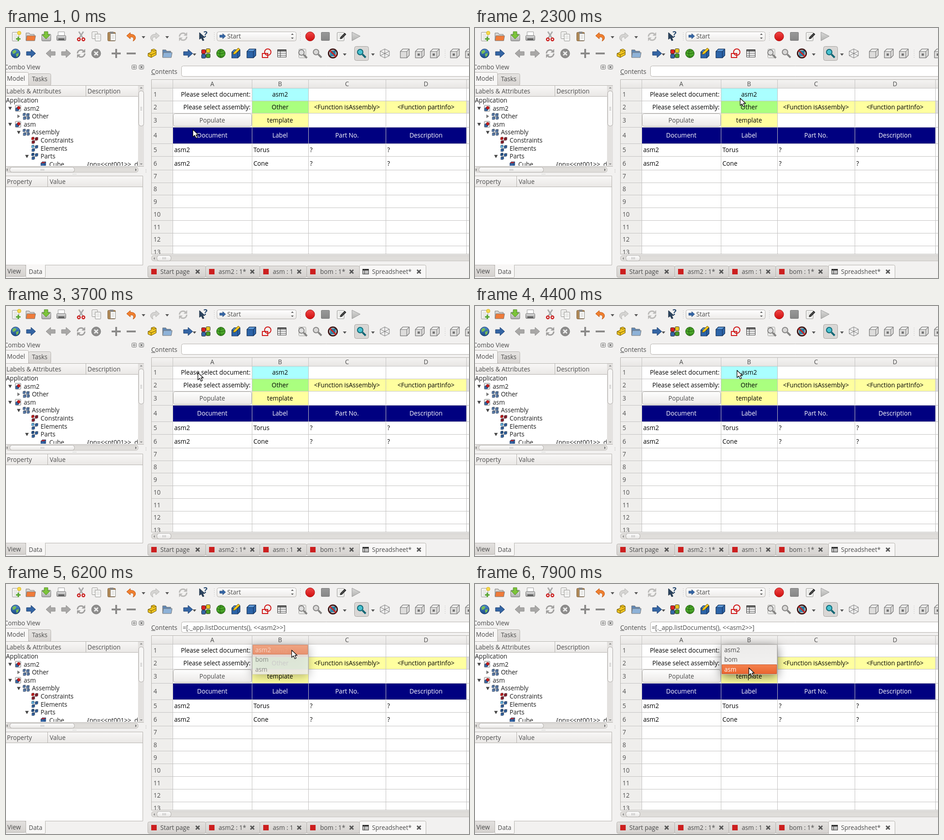
An HTML page with a canvas for the animation above (8 s loop, 1017x550 px).

```html
<!DOCTYPE html>
<html lang="en">
<head>
<meta charset="utf-8">
<title>Spreadsheet</title>
<style>
html, body { margin: 0; width: 100%; height: 100%; overflow: hidden; background: #f2f1f0; }
canvas { display: block; }
</style>
</head>
<body>
<canvas id="stage" width="1017" height="550"></canvas>
<script>
const W = 1017, H = 550, LOOP = 8000, STEP = 100;
const INK = '#4c4c4c', EDGE = '#b4b1ad', GRID = '#c3c2c1', BG = '#f2f1f0', BLUE = '#3465a4', RED = '#cc1f1f';
const screen = document.getElementById('stage').getContext('2d');
const base = document.createElement('canvas');
base.width = W;
base.height = H;
let g = base.getContext('2d');

function rect(x, y, w, h, fill) {
  g.fillStyle = fill;
  g.fillRect(x, y, w, h);
}

function box(x, y, w, h, fill, edge = EDGE, r = 0) {
  g.beginPath();
  g.roundRect(x + .5, y + .5, w - 1, h - 1, r);
  paint(fill, edge, 1);
}

function paint(fill, edge, lw = 1) {
  if (fill) { g.fillStyle = fill; g.fill(); }
  if (edge) { g.strokeStyle = edge; g.lineWidth = lw; g.stroke(); }
}

function circle(x, y, r, fill, edge, lw) {
  g.beginPath();
  g.arc(x, y, r, 0, 7);
  paint(fill, edge, lw);
}

function shape(x, y, d, fill, edge, lw = 1) {
  const p = new Path2D(d);
  g.save();
  g.translate(x, y);
  if (fill) { g.fillStyle = fill; g.fill(p); }
  if (edge) { g.strokeStyle = edge; g.lineWidth = lw; g.lineJoin = 'round'; g.stroke(p); }
  g.restore();
}

function fade(y, h, top, bottom) {
  const f = g.createLinearGradient(0, y, 0, y + h);
  f.addColorStop(0, top);
  f.addColorStop(1, bottom);
  return f;
}

function text(s, x, mid, color = '#1a1a1a', align = 'left') {
  g.font = '13.6px "Open Sans", "Noto Sans", sans-serif';
  g.fillStyle = color;
  g.textAlign = align;
  g.fillText(s, x, mid + 5);
}

const drop = (x, y) => shape(x, y, 'M-4-2H4L0 3Z', '#555');

function handle(x, y) {
  for (let i = -2; i <= 2; i++) rect(x, y + i * 4, 1, 1, '#aaa');
}

function cube(x, y, s, fill, edge, top = fill) {
  g.save();
  g.translate(x, y);
  g.scale(s, s);
  shape(0, 0, 'M-9-4L-4-9H9V4L4 9H-9Z', fill, edge, 1.2);
  shape(0, 0, 'M-9-4L-4-9H9L4-4Z', top, edge, 1);
  shape(0, 0, 'M4-4V9', null, edge, 1);
  g.restore();
}

function arrow(x, y, fill, edge, dir = 1, s = 1) {
  g.save();
  g.translate(x, y);
  g.scale(dir * s, s);
  shape(0, 0, 'M-10-4H0V-9L10 0L0 9V4H-10Z', fill, edge);
  g.restore();
}

function bend(x, y, fill, edge, dir) {
  g.save();
  g.translate(x, y);
  g.scale(dir, 1);
  shape(0, 0, 'M-10-2L-2-9V-5C6-6 11-1 9 5Q8 8 4 10C7 3 4 0-2 1V5Z', fill, edge);
  g.restore();
}

function reload(x, y, color) {
  shape(x, y, 'M-8 0A8 8 0 0 1 5-6M8 0A8 8 0 0 1-5 6', null, color, 3);
  shape(x, y, 'M9-10V-2H1ZM-9 10V2H-1Z', color);
}

function page(x, y, w = 14, h = 18) {
  box(x - w / 2, y - h / 2, w, h, '#fbfbfa', '#8c8c88', 1);
  for (let i = 4; i < h - 3; i += 3) rect(x - w / 2 + 3, y - h / 2 + i, w - 6, 1, '#c4c4c0');
}

function lens(x, y, color, glass) {
  shape(x, y, 'M2 2L9 9', null, color, 4);
  circle(x - 3, y - 3, 6, glass, color, 2);
}

function folder(x, y, back, front) {
  shape(x, y, 'M-10 8V-8H-3L-1-5H8V8Z', back, '#777');
  shape(x, y, 'M-10 9L-8-2H11L9 9Z', front, '#777');
}

function cross(x, y, r, color, lw) {
  shape(x, y, `M${-r} ${-r}L${r} ${r}M${r} ${-r}L${-r} ${r}`, null, color, lw);
}

function fileBar() {
  page(21, 19, 15, 20);
  circle(29, 11, 4, '#f5d94c', '#d8b520');
  shape(27, 24, 'M-5 0H5M0-5V5', null, '#55a630', 3);
  folder(54, 19, '#d9d7d3', '#ef7b3a');
  box(78, 13, 21, 16, fade(13, 16, '#e8e8e6', '#aaa'), '#777', 2);
  shape(88, 15, 'M-4-7H4V0H9L0 9L-9 0H-4Z', '#7cc43a', '#4b8a20');
  box(114, 8, 15, 10, '#fff', '#999');
  box(111, 16, 21, 12, fade(16, 12, '#ddd', '#999'), '#777', 2);
  rect(115, 23, 13, 3, '#555');
  shape(165, 18, 'M-5-10L4 4M5-10L-4 4', null, '#aaa', 3);
  circle(160, 25, 3, null, RED, 2.4);
  circle(170, 25, 3, null, RED, 2.4);
  page(195, 16, 13, 16);
  page(202, 21, 13, 16);
  box(223, 9, 18, 20, '#b08a58', '#80603a', 2);
  rect(228, 8, 8, 4, '#888');
  page(235, 20, 12, 16);
  bend(275, 19, '#f08030', '#c05510', 1);
  drop(302, 20);
  bend(327, 19, '#d5d4d2', '#b5b4b2', -1);
  drop(354, 20);
  reload(389, 19, '#bcbbb9');
  shape(425, 10, 'M0 0L0 15L4 12L7 18L10 17L7 11L12 11Z', '#2c4460', '#1a2c40');
  g.font = 'bold 18px "Open Sans", sans-serif';
  g.textAlign = 'left';
  g.fillStyle = '#27496f';
  g.fillText('?', 434, 20);
  handle(457, 18);
  box(463, 8, 175, 21, fade(8, 21, '#fff', '#eceae8'), EDGE, 4);
  arrow(476, 18, BLUE, '#1c3e6e', 1, .65);
  text('Start', 486, 18, INK);
  shape(629, 18, 'M-3-3L0-6L3-3ZM-3 3L0 6L3 3Z', '#555');
  handle(646, 18);
  circle(668, 18.5, 10, fade(9, 19, '#f04545', '#d01010'), '#a80d0d');
  box(692, 9, 19, 19, fade(9, 19, '#999', '#868686'), '#777', 1);
  page(735, 19, 16, 19);
  shape(737, 20, 'M-3 4L-2 0L7-9L10-6L1 3Z', '#444', '#222');
  shape(760, 18, 'M0-9L18 0L0 10Z', fade(-9, 19, '#d8d8d7', '#b4b4b2'), '#999');
}

function viewBar() {
  circle(21, 56, 10, fade(46, 20, '#4c88cc', '#1c4a86'), '#173c6c');
  shape(21, 56, 'M-7-5L-1-8L2-4L-2 0L-6 1ZM1 1L7-1L6 5L2 8Z', '#79bd55');
  arrow(55, 56, BLUE, '#1c3e6e');
  arrow(98, 56, '#a9a8a7', '#8c8b8a', -1);
  arrow(132, 56, '#a9a8a7', '#8c8b8a');
  reload(165, 56, '#a09f9e');
  circle(198, 56, 10, '#8e8d8c', '#777');
  cross(198, 56, 4, '#eee', 3);
  shape(242, 56, 'M-10 0H10M0-10V10', null, '#8b8a89', 4);
  rect(265, 54, 20, 4, '#8b8a89');
  shape(321, 56, 'M-9 0L-2-3V-8L4-10L9-7V3L-2 9L-9 6Z', '#f0c420', '#6a5200');
  shape(321, 56, 'M-9 0L-2 3L9-2M-2 3V9M-2-8L3-5L9-7', null, '#6a5200');
  folder(354, 56, '#5f87b4', '#8eb2d8');
  arrow(400, 56, BLUE, '#1c3e6e');
  drop(414, 58);
  [['#d22', 429, 47], ['#e8c520', 439, 45], [BLUE, 429, 57], ['#4a9a25', 439, 56]].forEach(([c, x, y]) =>
    box(x, y, 10, 10, c, '#333', 2));
  circle(472, 56, 9.5, '#4aa528', '#1f5c10');
  shape(472, 56, 'M-9-2Q0 3 9-2M-7 5Q0 9 7 5M-6-7Q0-3 6-7M0-9Q-5 0 0 9', null, '#1f5c10');
  cube(505, 57, 1, '#2c64a8', '#12305a', '#4f8dd0');
  shape(505, 53, 'M-6 5L-5 1L5-9L9-6L-1 4Z', '#f0c420', '#6a5200');
  cube(539, 56, 1.08, '#2c64a8', '#12305a', '#5c97d6');
  box(563, 55, 13, 11, null, '#d01818');
  shape(570, 60, 'M-7-4H5V5H-7Z', null, '#d01818', 2);
  circle(575, 53, 7, null, '#d01818', 2);
  sheet(606, 56, 20, 17);
  page(651, 56, 16, 20);
  lens(652, 57, '#858483', '#ddd');
  lens(684, 56, '#858483', '#d8d7d6');
  cube(718, 56, .65, '#2c8cb0', '#124a66');
  circle(718, 56, 9.5, null, '#3b1616', 3);
  shape(718, 56, 'M-7-7L7 7', null, RED, 3);
  drop(744, 58);
  box(765, 40, 32, 32, '#d9d7d5', '#a5a29f', 4);
  lens(781, 56, '#0d6674', '#49c1cf');
  drop(806, 58);
  shape(832, 56, 'M0-10L10-5V5L0 10L-10 5V-5ZM-10-5L0 0L10-5M0 0V10M0-10V0M-10 5L0 0L10 5', '#eee', '#777');
  [876, 909, 942, 986, 1019].forEach((x, i) => {
    cube(x, 56, 1.08, '#dddcdb', '#777', '#f0f0ef');
    if (i) rect(x - 5, 56, 5, 5, '#777');
  });
  handle(964, 56);
}

function sheet(x, y, w, h) {
  box(x - w / 2, y - h / 2, w, h, '#fff', '#333');
  rect(x - w / 2, y - h / 2, w, 3, '#333');
  for (let i = 1; i < 4; i++) rect(x - w / 2, Math.round(y - h / 2 + i * h / 4), w, 1, '#444');
  rect(x - w / 5, y - h / 2, 1, h, '#444');
}

function grip(x, y, w, h) {
  box(x, y, w, h, w > h ? fade(y, h, '#fff', '#e6e4e2') : '#f7f6f5', '#aaa7a4', 5);
  for (let i = -1; i <= 1; i++)
    w > h ? rect(x + w / 2 + i * 3, y + 4, 1, h - 8, '#aaa') : rect(x + 4, y + h / 2 + i * 3, w - 8, 1, '#aaa');
}

function docIcon(x, y) {
  box(x - 6, y - 7, 13, 14, '#f4f4f2', '#777', 1);
  cube(x - 1, y + 2, .4, BLUE, '#12305a');
  circle(x + 2, y - 1, 3.2, RED, '#801010');
}

function parts(x, y, a, b) {
  cube(x - 4, y - 4, .33, a, '#222');
  cube(x + 4, y - 3, .36, b, '#222');
  cube(x - 3, y + 4, .36, b, '#222');
  if (a === b) cube(x + 5, y + 4, .33, a, '#222');
}

function tree() {
  const row = i => 159 + i * 17.6;
  const open = (x, i) => shape(x, row(i), 'M-4-3H4L0 4Z', '#444');
  box(-2, 126, 305, 179, '#fff');
  rect(0, 127, 290, 23, fade(127, 23, '#f8f7f6', '#eae8e6'));
  rect(0, 150, 290, 1, EDGE);
  rect(175, 127, 1, 23, EDGE);
  text('Labels & Attributes', 1, 139, INK);
  text('Description', 179, 139, INK);
  g.save();
  g.beginPath();
  g.rect(0, 151, 289, 152);
  g.clip();
  text('Application', 0, row(0));
  [['asm2', 1], ['asm', 3]].forEach(([s, i]) => {
    open(9, i);
    docIcon(26, row(i));
    text(s, 39, row(i));
  });
  shape(27, row(2), 'M-2-4V4L4 0Z', '#777');
  parts(44, row(2), '#5b7fb0', '#5b7fb0');
  text('Other', 57, row(2));
  open(28, 4);
  parts(44, row(4), '#5b7fb0', '#5b7fb0');
  text('Assembly', 57, row(4));
  parts(63, row(5), RED, '#8c2130');
  text('Constraints', 76, row(5));
  parts(63, row(6), '#64b4e6', BLUE);
  text('Elements', 76, row(6));
  open(46, 7);
  parts(63, row(7), '#24548f', BLUE);
  text('Parts', 76, row(7));
  cube(82, row(8), .6, BLUE, '#12305a', '#c33');
  text('Cube', 95, row(8));
  text('{pn=<<pt001>>, d', 178, row(8));
  g.restore();
  rect(290, 127, 13, 177, '#e3e1df');
  grip(291, 138, 12, 78);
  shape(297, 132, 'M-3 1L0-2L3 1Z', '#888');
  shape(297, 299, 'M-3-1L0 2L3-1Z', '#888');
  box(0, 306, 291, 12, '#dfddda', '#c4c1be', 5);
  grip(8, 306, 143, 12);
  shape(285, 312, 'M-1-3L2 0L-1 3Z', '#666');
  shape(3, 312, 'M1-3L-2 0L1 3Z', '#888');
  for (let i = 0; i < 3; i++) rect(147 + i * 3, 321, 1, 1, '#999');
}

function sidePanel() {
  text('Combo View', -4, 86, INK);
  box(276, 81, 11, 10, '#f7f6f5', '#666', 2);
  box(279, 84, 5, 4, null, '#555');
  box(292, 81, 11, 10, '#f7f6f5', '#666', 2);
  cross(297.5, 86, 2.5, '#555', 1.4);
  box(49, 100, 50, 27, fade(100, 27, '#e6e4e2', '#d8d5d2'), EDGE, 3);
  box(-4, 97, 54, 33, '#f8f7f6', EDGE, 3);
  text('Model', 2, 111, INK);
  text('Tasks', 57, 112, INK);
  tree();
  box(-2, 325, 303, 197, '#fff');
  rect(0, 326, 300, 23, fade(326, 23, '#f8f7f6', '#eae8e6'));
  rect(0, 349, 300, 1, EDGE);
  rect(91, 326, 1, 23, EDGE);
  text('Property', 2, 338, INK);
  text('Value', 96, 338, INK);
  box(-4, 521, 48, 26, fade(521, 26, '#e3e1df', '#d5d2cf'), EDGE, 3);
  box(43, 520, 44, 30, '#f8f7f6', EDGE, 3);
  rect(44, 520, 42, 2, '#f8f7f6');
  text('View', 3, 535, INK);
  text('Data', 50, 536, INK);
  for (let i = 0; i < 3; i++) rect(307, 311 + i * 3, 1, 1, '#999');
}

const cols = [366, 540, 664, 834, 1011];
const rows = [132, 160, 187, 218, 254, 282, 312, 340, 367, 395, 423, 451, 479, 507];
const mid = [146, 174, 203, 236, 268, 298, 326, 354, 382, 410, 438, 465, 493];
const center = c => (cols[c] + cols[c + 1]) / 2;

function cell(c, r, fill, s, color = '#000') {
  rect(cols[c] + 1, rows[r] + 1, cols[c + 1] - cols[c] - 1, rows[r + 1] - rows[r] - 1, fill);
  if (s) text(s, center(c), mid[r], color, 'center');
}

function table() {
  text('Contents', 319, 96, INK);
  rect(319, 102, 9, 1, INK);
  box(385, 83, 640, 24, '#fff', EDGE, 4);
  g.save();
  g.beginPath();
  g.rect(319, 113, 698, 385);
  g.clip();
  rect(319, 113, 698, 385, '#fff');
  rect(319, 113, 698, 19, fade(113, 19, '#f5f4f3', '#e8e6e4'));
  rect(319, 132, 47, 366, '#efeeec');
  rows.forEach((y, i) => {
    rect(319, y, 698, 1, GRID);
    if (i < mid.length) text(String(i + 1), 324, mid[i], INK);
  });
  cols.forEach((x, i) => {
    rect(x, 113, 1, 385, GRID);
    if (i < 4) text('ABCD'[i], center(i), 123, INK, 'center');
  });
  text('Please select document:', 537, mid[0], '#000', 'right');
  text('Please select assembly:', 537, mid[1], '#000', 'right');
  cell(1, 0, '#aaffff', 'asm2');
  cell(1, 1, '#aaff7f', 'Other');
  cell(2, 1, '#ffff9f', '<Function isAssembly>');
  cell(3, 1, '#ffff9f', '<Function partInfo>');
  rect(1012, 161, 5, 26, '#e2e0e4');
  cell(1, 2, '#ffff9f', 'template');
  box(367, 188, 173, 29, fade(188, 29, '#fefefe', '#ebe9e7'), EDGE, 4);
  text('Populate', center(0), mid[2], INK, 'center');
  ['Document', 'Label', 'Part No.', 'Description'].forEach((s, c) => cell(c, 3, '#000080', s, '#fff'));
  ['Torus', 'Cone'].forEach((s, i) =>
    ['asm2', s, '?', '?'].forEach((v, c) => text(v, cols[c] + 3.5, mid[4 + i], '#000')));
  g.restore();
  box(319, 113, 710, 385, null);
  box(319, 500, 710, 13, '#dfddda', '#c4c1be', 5);
  grip(331, 500, 32, 13);
  shape(326, 507, 'M1-3L-2 0L1 3Z', '#888');
}

function docTabs() {
  const tabs = [[311, 'Start page', 339, 421], [438, 'asm2 : 1*', 467, 541], [557, 'asm : 1', 586, 644],
    [660, 'bom : 1*', 690, 759], [776, 'Spreadsheet*', 804, 907]];
  tabs.forEach(([x, s, tx, cx], i) => {
    const last = i === 4, end = last ? 923 : tabs[i + 1][0] + 1;
    box(x, last ? 521 : 523, end - x, last ? 34 : 26, last ? '#f8f7f6' : fade(523, 26, '#e3e1df', '#d5d2cf'), EDGE, 3);
    if (last) sheet(790, 536, 14, 12);
    else rect(x + 8, 530, 12, 12, RED);
    text(s, tx, 536, INK);
    cross(cx, 536, 4, '#555', 3);
  });
}

// Pointer path: time, x, y
const path = [[0, 410, 223], [900, 410, 223], [1000, 413, 223], [1300, 413, 223], [1700, 490, 214],
  [2200, 588, 157], [2500, 570, 147], [2700, 570, 147], [2900, 518, 148], [3500, 399, 147], [3600, 399, 147],
  [4400, 575, 141], [4500, 588, 141], [4900, 588, 141], [5300, 627, 145], [7100, 627, 145], [7200, 621, 152],
  [7500, 612, 167], [7600, 612, 167], [7900, 601, 184], [LOOP, 601, 184]];

function pointer(t) {
  const i = path.findIndex(k => k[0] > t);
  const [t0, x0, y0] = path[i - 1], [t1, x1, y1] = path[i];
  const k = (t - t0) / (t1 - t0);
  return [Math.round(x0 + (x1 - x0) * k), Math.round(y0 + (y1 - y0) * k)];
}

function popup(y, alpha) {
  const pick = y < 156 ? 0 : y < 177 ? 1 : 2;
  g.save();
  g.globalAlpha = alpha;
  g.shadowColor = 'rgba(0,0,0,.5)';
  g.shadowBlur = 22;
  g.shadowOffsetY = 5;
  rect(541, 133, 123, 66, '#f0efee');
  g.shadowColor = 'transparent';
  box(541, 133, 123, 66, fade(133, 66, '#ecebea', '#f4f3f2'), '#c8c5c2');
  ['asm2', 'bom', 'asm'].forEach((s, i) => {
    const top = Math.round(134 + i * 21.3);
    if (i === pick) box(542, top, 121, 21, fade(top, 21, '#f4834f', '#e9642f'), '#c9562a');
    text(s, 547.5, 145 + i * 21.3, i === pick ? '#fff' : INK);
  });
  g.restore();
}

function draw(now) {
  const t = Math.floor(now % LOOP / STEP) * STEP;
  const [x, y] = pointer(t);
  g.drawImage(base, 0, 0);
  if (t >= 4600) {
    text('=[._app.listDocuments(), <<asm2>>]', 388, 96, INK);
    cell(1, 0, '#f07746', 'asm2', '#fff');
  }
  if (t >= 6200) popup(y, t < 6300 ? .6 : 1);
  shape(x + .5, y + .5, 'M0 0V16L4 12.5L7 19L10 17.5L7 11.5H12Z', '#fff', '#111', 1.3);
}

rect(0, 0, W, H, BG);
fileBar();
viewBar();
sidePanel();
table();
docTabs();
g = screen;

let start;
function tick(now) {
  start ??= now;
  draw(now - start);
  requestAnimationFrame(tick);
}
draw(0);
requestAnimationFrame(tick);
</script>
</body>
</html>
```
